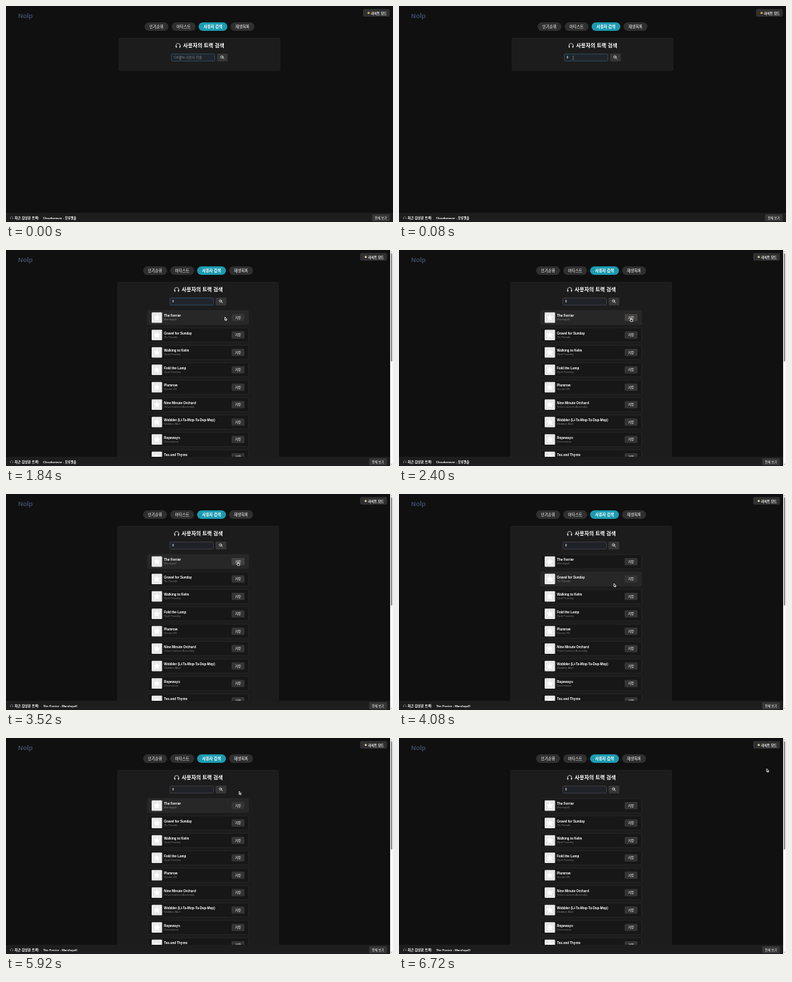
Animation of 542 by 304 pixels, one loop 6.8 s. Source, as an HTML page:

```html
<!DOCTYPE html>
<html lang="ko">
<head>
<meta charset="utf-8">
<title>트랙 검색</title>
<style>
html, body { margin: 0; width: 100%; height: 100%; overflow: hidden; background: #101010; }
svg { display: block; width: 542px; height: 304px; }
text { font-family: "Liberation Sans", "Noto Sans CJK KR", "Noto Sans CJK", sans-serif; fill: #fff; white-space: pre; }
.b { font-weight: bold; }
.mid { text-anchor: middle; }
.line { fill: none; stroke: #f0f0f0; stroke-linecap: round; }
</style>
</head>
<body>
<svg viewBox="0 0 542 304" xmlns="http://www.w3.org/2000/svg">
  <defs>
    <g id="phones" class="line">
      <path d="M.6 5V4a3.1 3.1 0 0 1 6.2 0v1" stroke-width=".7"/>
      <path d="M1.2 4.7v1.7M6.2 4.7v1.7" stroke-width="1.3"/>
    </g>
    <path id="star" d="M0-4.6 1.4-1.6 4.6-1.3 2.2.9 2.9 4.1 0 2.4-2.9 4.1-2.2.9-4.6-1.3-1.4-1.6Z" fill="#fff"/>
  </defs>
  <text x="17" y="16.8" class="b" font-size="9.2" style="fill:#3f4963">Nolp</text>
  <g id="main">
    <g id="tabs"></g>
    <rect id="panel" x="156.25" y="45.25" width="225.5" rx="1.5" fill="#1c1c1c" stroke="#2a2a2a" stroke-width=".5"/>
    <use href="#phones" x="235.3" y="51.8"/>
    <text x="246" y="58" class="b" font-size="7.3">사용자의 트랙 검색</text>
    <rect id="field" x="229.5" y="67.5" width="61" height="10" rx="1" stroke-width=".8"/>
    <text id="hint" x="233" y="73.8" font-size="4.7" style="fill:#777c82">Orlu.fm 사용자 이름</text>
    <text id="typed" x="233" y="73.8" font-size="4.7">fi</text>
    <rect x="293.5" y="67" width="15" height="11" rx="1.2" fill="#363636"/>
    <g class="line" stroke-width=".8"><circle cx="300.4" cy="71.7" r="1.6"/><path d="M301.7 73 303.1 74.4"/></g>
    <g id="list"></g>
  </g>
  <rect y="291" width="542" height="13" fill="#1d1d1d"/>
  <use href="#phones" transform="translate(5.8 295.8) scale(.58)" opacity=".6"/>
  <text x="12" y="299.6" class="b" font-size="4.7">최근 감상한 트랙:</text>
  <text id="recent" x="52" y="299.6" class="b" font-size="4.3"></text>
  <g id="right">
    <rect x="496" y="4.3" width="37.5" height="10.8" rx="2" fill="#303030"/>
    <circle id="sun" cx="503.8" cy="9.8" r="1.5"/>
    <text x="507.3" y="11.5" class="b" font-size="4.5">라이트 모드</text>
    <rect x="508.5" y="293" width="25" height="10" rx="1.5" fill="#363636"/>
    <text x="521" y="299.7" class="mid" font-size="4.3">전체 보기</text>
  </g>
  <g id="bar">
    <rect x="538" width="4" height="304" fill="#fafafa"/>
    <rect x="539" y="4.5" width="2" height="152.5" rx="1" fill="#8b8b8b"/>
    <path d="M539 3 540 1.6 541 3ZM539 301 540 302.4 541 301Z" fill="#8b8b8b"/>
  </g>
  <g id="pointer">
    <g fill="#000" stroke="#fff" stroke-width=".8">
      <path id="arrow" d="M0 0V4.3L1 3.4 1.7 5 2.5 4.6 1.8 3.1H3.1Z"/>
      <path id="hand" d="M-.6.2Q0-.5.5.2V2L2.4 2.5 2.2 4.7H-.7L-2 2.8-1.4 2.2-.6 2.9Z"/>
    </g>
    <path id="beam" d="M-.8-2.3H.8M0-2.3V2.3M-.8 2.3H.8" fill="none" stroke="#bbb" stroke-width=".4"/>
  </g>
</svg>
<script>
const LOOP = 6800, STEP = 80;
const TYPED = 80, LOADED = 1120, CLICKED = 2240, SAVED = 3520;
const $ = id => document.getElementById(id);

const tabs = [
  [192, 33.5, '인기순위'], [230, 33.5, '아티스트'],
  [267.7, 40.3, '사용자 검색'], [312.3, 33.7, '재생목록']
];
const tracks = [
  ['The Ferrier', 'Marshquill'],
  ['Gravel for Sunday', 'Tin Parade'],
  ['Walking to Kelm', 'Opal Foundry'],
  ['Fold the Lamp', 'Opal Foundry'],
  ['Plumrow', 'Gorran Elt'],
  ['Nine Minute Orchard', 'Velvet Lantern Assembly'],
  ['Wobbler (Li-Ta-Mop-Ta-Dup-Mop)', 'Wobbler Abel'],
  ['Ropeways', 'Dunmarrow'],
  ['Tea and Thyme', 'Sloe Pepper']
];
// time, x, y of the pointer tip
const path = [
  [0, 244, 73], [1520, 244, 73], [1600, 250, 76], [1840, 306.5, 94.5],
  [2080, 324, 96], [2240, 325, 96], [3600, 325, 96], [4080, 301, 126],
  [4400, 287, 146], [4640, 277, 156.5], [4880, 277, 156.5], [4960, 274.8, 144.8],
  [5280, 278, 140], [5520, 278, 140], [5920, 326.5, 75], [6240, 400, 63],
  [6720, 515, 43.3]
];
const rowTop = i => 85 + i * 24.5;

$('tabs').innerHTML = tabs.map(([x, w, label], i) => `
  <rect x="${x}" y="23" width="${w}" height="12" rx="6" fill="${i === 2 ? '#1b9bb0' : '#2f2f2f'}"/>
  <text x="${x + w / 2}" y="31" class="mid${i === 2 ? ' b' : ''}" font-size="5.4">${label}</text>`).join('');

$('list').innerHTML = tracks.map(([title, artist], i) => `
  <g transform="translate(198 ${rowTop(i)})">
    <rect class="row" x=".25" y=".25" width="141.5" height="19.8" rx="1.5" stroke="#333" stroke-width=".5"/>
    <rect x="6" y="2.8" width="14.6" height="14.6" rx="1" fill="#e9e9e9"/>
    <use href="#star" x="13.3" y="10.1"/>
    <text x="23.2" y="9.1" class="b" font-size="4.55">${title}</text>
    <text x="23.2" y="14" font-size="3.9" style="fill:#777">${artist}</text>
    <rect class="save" x="118" y="5" width="18" height="10.2" rx="1.2"/>
    <text x="127" y="11.7" class="mid" font-size="4.3">저장</text>
  </g>`).join('');

const rows = document.querySelectorAll('.row');
const saves = document.querySelectorAll('.save');
const show = (id, on) => $(id).setAttribute('display', on ? 'inline' : 'none');
const fill = (el, color) => el.setAttribute('fill', color);
const inside = ([x, y], l, t, w, h) => x >= l && x <= l + w && y >= t && y <= t + h;

function pointerAt(t) {
  const i = path.findIndex(p => p[0] > t);
  if (i < 0) return path[path.length - 1].slice(1);
  const [t0, x0, y0] = path[i - 1], [t1, x1, y1] = path[i];
  const k = (t - t0) / (t1 - t0);
  return [x0 + (x1 - x0) * k, y0 + (y1 - y0) * k];
}

function draw(t) {
  const loaded = t >= LOADED, focused = t < CLICKED;
  const tip = pointerAt(t);
  // hover styles trail the pointer by one step
  const hover = pointerAt(Math.max(0, t - STEP));

  $('main').setAttribute('transform', `translate(${loaded ? 0 : 2})`);
  $('right').setAttribute('transform', `translate(${loaded ? 0 : 4})`);
  $('panel').setAttribute('height', loaded ? 270 : 45.5);
  show('list', loaded);
  show('bar', loaded);
  show('hint', t < TYPED);
  show('typed', t >= TYPED);
  fill($('sun'), loaded ? '#d8cda8' : '#e5b544');
  fill($('field'), focused ? '#20252b' : '#1f2226');
  $('field').setAttribute('stroke', focused ? '#2d5068' : '#404346');
  $('recent').textContent = t < SAVED ? 'Cloudweaver - 모루별솔' : 'The Ferrier - Marshquill';

  let onSave = false;
  rows.forEach((row, i) => {
    const top = rowTop(i);
    const over = loaded && inside(hover, 198, top, 142, 20.3);
    const press = over && inside(hover, 316, top + 5, 18, 10.2);
    fill(row, over ? '#272727' : '#171717');
    fill(saves[i], press ? '#434140' : '#343434');
    onSave = onSave || press;
  });

  const onField = inside(tip, 229, 67, 64, 11);
  show('beam', onField);
  show('hand', onSave);
  show('arrow', !onField && !onSave);
  $('pointer').setAttribute('transform', `translate(${tip[0]} ${tip[1]})`);
}

function tick() {
  const t = performance.now() % LOOP;
  draw(Math.floor(t / STEP) * STEP);
  requestAnimationFrame(tick);
}
tick();
</script>
</body>
</html>
```
